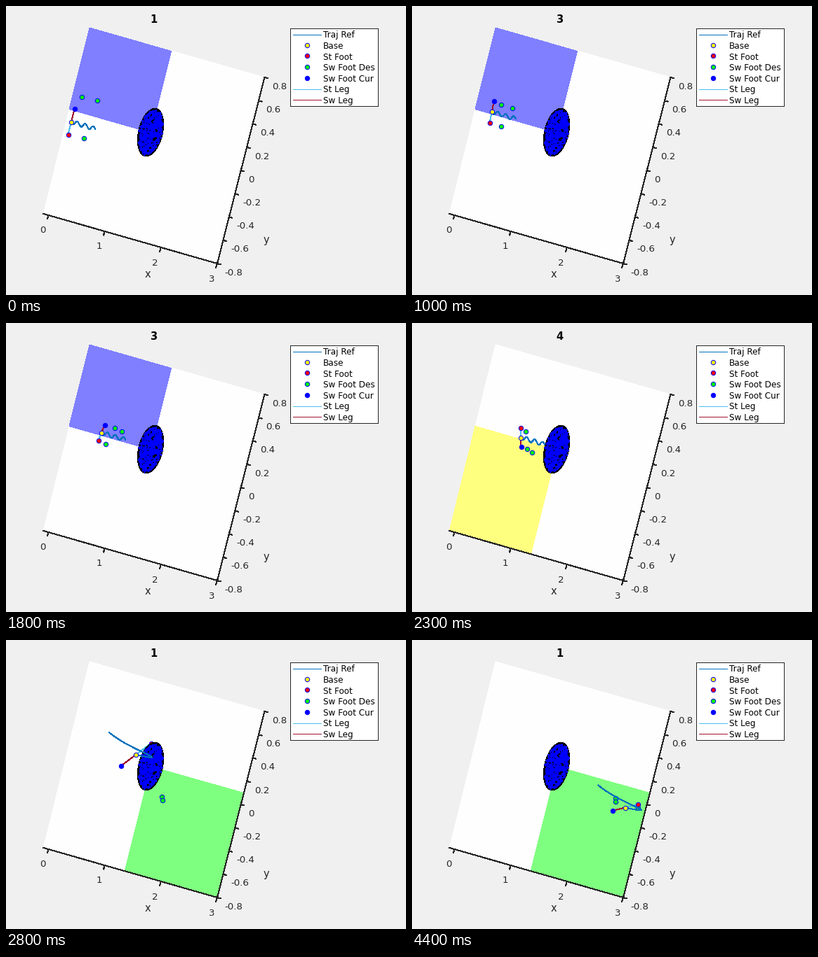
A matplotlib script that plays this animation: 570 px wide and 413 px high, repeating every 4.5 s.

```python
import numpy as np
import matplotlib.pyplot as plt
from matplotlib.animation import FuncAnimation
from matplotlib.patches import Polygon, Rectangle

W, H, DPI = 570, 413, 64
FRAMES, INTERVAL, PHASES = 45, 100, 4
PT = 72 / DPI  # points per pixel

plt.rcParams["font.family"] = "DejaVu Sans"
INK = "#262626"
BLUE, RED, GREEN, YELLOW = "#0000ff", "#ff0000", "#00ff00", "#ffff00"
TRAJ, ST_LEG, SW_LEG = "#0072bd", "#4dbeee", "#a2142f"

# Floor corners, and the point where its regions meet
TOP, RIGHT, BOTTOM, LEFT = np.array([(119.5, 31), (369, 102), (301.5, 368), (54, 297)])
MID, MID_L, MID_R = (207, 181), (90.5, 147.5), (339, 218.5)
MID_T, MID_B = (236, 64.5), (170, 330)
X_UNIT, Y_UNIT = np.array([80, 23.4]), np.array([42.2, -166.2])

# Footholds in order: each step swings from one to the next but one
FEET = np.array([
    (98, 147), (89, 184), (108, 130), (111, 167), (127, 141), (132, 168),
    (155, 150), (164, 180), (207, 148), (222, 224), (259, 214), (286, 244),
    (322, 235), (290, 226)], float)
TURN = 7  # step at which the walker rounds the ball

fig = plt.figure(figsize=(W / DPI, H / DPI), dpi=DPI, facecolor="#f0f0f0")
ax = fig.add_axes([0, 0, 1, 1])
ax.set_xlim(0.5, W + 0.5)
ax.set_ylim(H, 0)
ax.axis("off")


def line(pts, color, z=2, width=1.0):
    pts = np.asarray(pts, float).reshape(-1, 2)
    return ax.plot(pts[:, 0], pts[:, 1], color=color, lw=width * PT,
                   zorder=z, antialiased=False)[0]


def dot(pos, face, z=3):
    return ax.plot([pos[0]], [pos[1]], "o", ms=6.4 * PT, mfc=face, mec=BLUE,
                   mew=PT, zorder=z)[0]


def label(x, y, s, px=13.33, color=INK, **kw):
    return ax.text(x, y, s, fontsize=px * PT, color=color, va="baseline",
                   zorder=9, **kw)


def area(pts, color, z):
    return ax.add_patch(Polygon(pts, fc=color, ec="none", zorder=z,
                                antialiased=False))


def draw_axes():
    line([LEFT, BOTTOM, RIGHT], INK)
    for n in range(4):
        tick = np.array([61, 299]) + n * X_UNIT
        line([tick, tick + (-1.4, 5)], INK)
        label(53.3 + 80 * n, 324 + 23.3 * n, str(n), ha="center")
    for n in range(9):
        tick = RIGHT + n * (BOTTOM - RIGHT) / 8
        line([tick, tick + (4.5, 1.3)], INK)
        label(379.5 - 8.4 * n, 119 + 33.2 * n, f"{(4 - n) / 5:g}")
    label(202, 388, "x", 14.67, ha="center")
    label(371, 339, "y", 14.67, ha="center")


def draw_legend():
    ax.add_patch(Rectangle((405.5, 31.5), 125, 111, fc="white", ec=INK, lw=PT,
                           zorder=7, antialiased=False))
    rows = [("Traj Ref", TRAJ, False), ("Base", YELLOW, True), ("St Foot", RED, True),
            ("Sw Foot Des", GREEN, True), ("Sw Foot Cur", BLUE, True),
            ("St Leg", ST_LEG, False), ("Sw Leg", SW_LEG, False)]
    for n, (name, color, is_dot) in enumerate(rows):
        y = 40.5 + 15.6 * n
        if is_dot:
            dot((429.5, y - 0.3), color, 8)
        else:
            line([(409.5, y), (449.5, y)], color, 8)
        label(452, y + 5, name, 12, "black")


def draw_ball(center=(206.5, 180.5), r=0.2, n=520):
    def place(rad, ang):
        return center + r * (np.outer(rad * np.cos(ang), X_UNIT)
                             + np.outer(rad * np.sin(ang), Y_UNIT))

    rng = np.random.default_rng(4)
    ring = place(np.ones(80), np.linspace(0, 2 * np.pi, 80))
    area(ring, "black", 4)
    line(ring, "black", 4)
    a = place(0.94 * rng.random(n) ** 0.55, rng.uniform(0, 2 * np.pi, n))
    b = a + rng.uniform(-1.7, 1.7, (n, 2))
    gap = np.full((n, 2), np.nan)
    line(np.stack([a, b, gap], 1), BLUE, 4.1)


floor = area([TOP, RIGHT, BOTTOM, LEFT], "#fefefe", 0)
regions = [area([TOP, MID_T, MID, MID_L], "#7f7fff", 1),
           area([MID_L, MID, MID_B, LEFT], "#ffff7f", 1),
           area([MID, MID_R, BOTTOM, MID_B], "#7fff7f", 1)]
draw_axes()
draw_legend()
draw_ball()

title = label(211, 24, "1", 14.67, "black", ha="center", weight="bold")
traj = line([TOP, TOP], TRAJ, 5)
traj.set_clip_path(floor)
st_leg = line([TOP, TOP], ST_LEG)
sw_leg = line([TOP, TOP], SW_LEG)
goals = [dot(TOP, GREEN) for _ in range(3)]
st_foot = dot(TOP, RED, 3.2)
sw_foot = dot(TOP, BLUE, 3.3)
base_dot = dot(TOP, YELLOW, 6)


def path_ahead(base, turned):
    """A wavy run forward, or after the turn a loop that doubles back."""
    u = np.linspace(0, 1, 60)
    if turned:
        v = 1 - u
        x = 3 * v * v * u * 58 - 3 * v * u * u * 8 - u ** 3 * 38
        y = 3 * v * v * u * 12 - 3 * v * u * u * 6 - u ** 3 * 32
    else:
        x = 34 * u
        y = 10 * u + 3 * np.sin(6 * np.pi * u)
    return base + np.stack([x, y], 1)


def move(artist, *pts):
    artist.set_data(*np.array(pts).T)


def draw(i):
    k, phase = divmod(i, PHASES)
    start, stance, target = FEET[k:k + 3]
    swing = start + (target - start) * phase / PHASES
    base = (stance + swing) / 2
    turned = k >= TURN

    title.set_text(str(phase + 1))
    active = 2 if turned else k % 2
    for n, region in enumerate(regions):
        region.set_visible(n == active)

    # Planned strides shorten as the walk goes on
    stride = np.array([max(0, 22 - 3 * k), 5])
    for goal, pos in zip(goals, (target, stance + stride, target + stride)):
        move(goal, pos)

    move(traj, *path_ahead(base, turned))
    move(st_leg, base, stance)
    move(sw_leg, base, swing)
    move(st_foot, stance)
    move(sw_foot, swing)
    move(base_dot, base)
    return []


anim = FuncAnimation(fig, draw, frames=FRAMES, interval=INTERVAL,
                     repeat=True, repeat_delay=0, blit=False)
plt.show()
```
